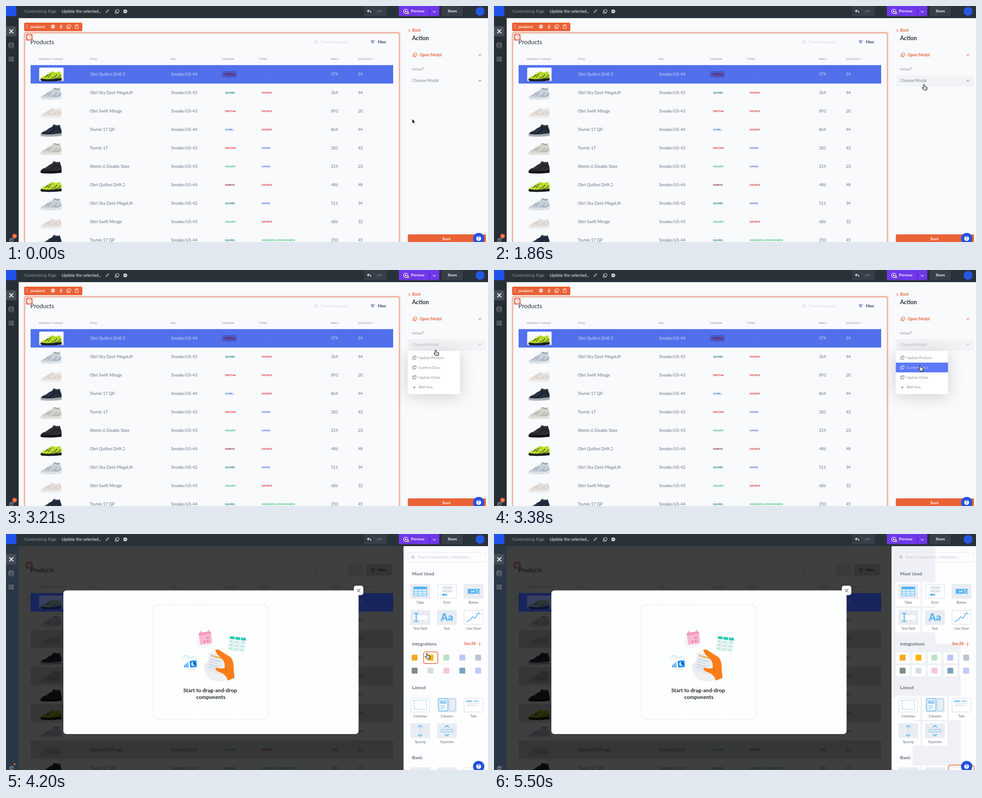
Write an HTML page that moves like this. It is 1067x525 px and loops after 6300 ms.

```html
<!DOCTYPE html>
<html lang="en">
<head>
<meta charset="utf-8">
<title>Product admin</title>
<style>
html, body { margin: 0; width: 100%; height: 100%; overflow: hidden; background: #f8fafc; }
svg { display: block; width: 100%; height: 100%; }
text { font-family: Lato, "Open Sans", sans-serif; white-space: pre; }
</style>
</head>
<body>
<svg id="stage" viewBox="0 0 1067 525"></svg>
<script>
const ORANGE = '#ea6237', BLUE = '#56b5ef', GREY = '#697483';

// Drawing helpers; text is placed by its vertical centre
const text = (x, y, s, size, fill, weight = 400, anchor = 'start') =>
  `<text x="${x}" y="${y}" dy=".35em" font-size="${size}" fill="${fill}" font-weight="${weight}" text-anchor="${anchor}">${s}</text>`;
const rect = (x, y, w, h, fill, r = 0, more = '') =>
  `<rect x="${x}" y="${y}" width="${w}" height="${h}" rx="${r}" fill="${fill}" ${more}/>`;
const circle = (x, y, r, fill, more = '') => `<circle cx="${x}" cy="${y}" r="${r}" fill="${fill}" ${more}/>`;
const line = (d, stroke, w = 1, more = '') =>
  `<path d="${d}" fill="none" stroke="${stroke}" stroke-width="${w}" ${more}/>`;
const shape = (d, fill, more = '') => `<path d="${d}" fill="${fill}" ${more}/>`;
const group = (id, body, more = '') => `<g id="${id}" ${more}>${body}</g>`;
const outline = (color, w = 1) => `stroke="${color}" stroke-width="${w}"`;

const copyIcon = (x, y, c) =>
  rect(x - 2, y - 4, 6, 6, 'none', 1, outline(c)) + line(`M${x - 2} ${y - 2}h-2v6h6v-2`, c);
const windowIcon = (x, y, c) => copyIcon(x, y, c) + line(`M${x - 2} ${y - 2.3}h6`, c);
const chevron = (x, y, c) => line(`M${x - 2.8} ${y - 1.3}l2.8 2.8l2.8 -2.8`, c, 1.1);
const searchIcon = (x, y, c) =>
  circle(x - .5, y - .5, 2.8, 'none', outline(c)) + line(`M${x + 1.6} ${y + 1.6}l2.2 2.2`, c);
const gearIcon = (x, y, c) =>
  circle(x, y, 2.5, 'none', outline(c, 1.8)) + circle(x, y, 3.9, 'none', outline(c, 1.2) + ' stroke-dasharray="1.6 1.46"');

// Table
const shoes = [
  ['Obri Quillon Drift 2', '#b7db2b', '#1c1f20', '#1c1f20', 0],
  ['Obri Sky Dash MegaLift', '#c8d0da', '#dfe3e9', '#7d8793', 1],
  ['Obri Swift Mirage', '#e3dfdd', '#ececec', '#dfb49f', 0],
  ['Tovrek 17 QP', '#1f2a38', '#a9acb1', '#444c5a', 1],
  ['Tovrek 17', '#d0d3cb', '#e0e2de', '#8d9786', 1],
  ['Wenlo 6 Double Slate', '#25272b', '#121315', '#4b4e54', 1],
];
const vendors = { DURVO: '#7a1320', QUORIL: '#12776f', MEZTAR: '#d8262c', UMBLI: '#3b6fd8', HALVEN: '#27b45c' };
const types = { SHORTS: '#d8262c', SHOES: '#3b5fe0', 'HOODIES &amp; SWEATSHIRTS': '#27b45c' };
const rows = [
  [0, 44, 'DURVO', 'SHOES', 579, 24], [1, 42, 'QUORIL', 'SHORTS', 364, 44],
  [2, 43, 'MEZTAR', 'SHORTS', 893, 20], [3, 44, 'UMBLI', 'SHORTS', 864, 44],
  [4, 42, 'MEZTAR', 'SHOES', 283, 43], [5, 43, 'HALVEN', 'SHOES', 214, 23],
  [0, 44, 'DURVO', 'SHORTS', 486, 48], [1, 42, 'QUORIL', 'SHOES', 511, 34],
  [2, 43, 'HALVEN', 'SHORTS', 686, 32], [3, 44, 'QUORIL', 'HOODIES &amp; SWEATSHIRTS', 350, 45],
];
const rowY = i => 152 + i * 41;

function shoe(y, [, upper, sole, accent, high]) {
  return `<g transform="translate(100 ${y + 1})">` +
    (high ? shape('M1 -6L6 -13Q13 -9 19 -12L22 0L5 2Z', upper) + line('M7 -11Q13 -7 19 -10', accent, 1.6) : '') +
    shape('M-23 10Q-22 4 -13 2L-3 -5L4 -8Q10 -2 19 -8Q24 -2 23 10Z', upper) +
    line('M-13 5L-6 -1M-7 6L0 -3M0 7Q8 7 13 -1M8 8Q18 7 21 1', accent, 1.2) +
    shape('M-23 8Q-8 12 23 7V13Q0 16 -21 14Q-25 12 -23 8Z', sole) + '</g>';
}

function tableRow([kind, size, vendor, type, price, count], i) {
  const y = rowY(i), first = i === 0, ink = first ? '#ccd5fb' : GREY;
  return (first ? rect(54.5, 131.5, 802.5, 41, '#5270eb') + rect(73.5, 137, 54, 30, '#fafcfd', 2) +
      rect(478.5, 145, 32.5, 14, '#4a57c4', 2) : '') +
    shoe(y, shoes[kind]) +
    text(185.5, y, shoes[kind][0], 9.2, ink) + text(365.5, y, 'Sneake/US-' + size, 9.1, ink) +
    text(485, y, vendor, 5.9, vendors[vendor], 700) +
    text(566, y, type, 5.9, first ? '#5875ec' : types[type], 700) +
    text(719.5, y, price, 8.8, ink) + text(779.5, y, count, 8.8, ink);
}

const heads = [[73, 'PRODUCT IMAGE'], [185, 'TITLE'], [365, 'SKU'], [478, 'VENDOR'], [559, 'TYPES'], [719, 'PRICE'], [779, 'QUANTITY']];
const table =
  text(54, 80, 'Products', 13.5, '#262d36') +
  searchIcon(687, 80, '#c5cad2') + text(698.5, 80, 'Search products...', 8, '#d3d8de') +
  line('M807 77.5h9M808.7 80.3h5.6M810.2 83h2.6', '#1f3380', 1.2) +
  text(823, 80, 'Filter', 8, '#1f2a55', 700) +
  heads.map(([x, s]) => text(x, 118, s, 6.5, '#858e9b')).join('') +
  rows.map(tableRow).join('') +
  rect(44, 62, 15, 15, '#e58877', 2) + circle(51.5, 69.5, 4.7, '#fff') +
  line('M51.5 66.8v3.3M51.5 71.2v1.2', '#d9705c', 1.3);

const selection =
  rect(40.5, 59, 831, 480, 'none', 4, outline('#f7d6cc', 4)) +
  rect(41.5, 60, 829, 480, 'none', 3, outline('#ec9780', 1.3)) +
  rect(40, 37, 129, 19, ORANGE, 3) +
  line('M45.5 42v9M48 42v9', '#fff', 1.1, 'stroke-dasharray="1.1 2.3"') +
  text(54, 46, 'products', 8.2, '#fff', 700) +
  gearIcon(104, 46, '#fff') + line('M123 41.8l-4 5h2.6l-1 4l4 -5.2h-2.6z', '#fff', .9) +
  copyIcon(139, 46, '#fff') + line('M152.7 43h7.6M155 43v-1.3h3v1.3M153.7 43v7h5.6v-7', '#fff', .9);

// Action panel and its menu
const actionPanel =
  rect(880, 27, 187, 498, '#f8fafc') +
  line('M894 51.8l-2.4 2.8l2.4 2.8', ORANGE, 1.1) + text(899, 54, 'Back', 8.8, ORANGE, 700) +
  text(899, 72, 'Action', 12.6, '#262d36', 700) +
  copyIcon(905, 109, ORANGE) + text(916, 108.5, 'Open Modal', 8.8, ORANGE, 700) + chevron(1049, 109, ORANGE) +
  text(899, 140.5, 'MODAL', 6.5, '#6d7683') + text(921.5, 140, '*', 9, ORANGE, 700) +
  group('hover', rect(890, 154, 172.5, 25, '#f2f3f5', 3)) +
  group('choose', text(899.5, 165.5, 'Choose Modal', 9.2, '#75808e') + chevron(1049, 166, '#75808e')) +
  rect(889.5, 508, 173, 30, ORANGE, 3) + text(975.5, 518, 'Back', 8.2, '#fff', 700, 'middle');

const options = ['Update Product', 'Confirm Docs', 'Update Order', 'Add new'];
const optionTop = i => 184.2 + i * 21.8;
const menu =
  rect(889.5, 180, 115.5, 96, '#fff', 5, 'filter="url(#shade)"') +
  options.map((s, i) => {
    const y = optionTop(i) + 10.9;
    const label = c => (i < 3 ? windowIcon(904, y, c) : line(`M904 ${y - 3}v7M900.5 ${y + .5}h7`, c)) + text(913.5, y, s, 8, c);
    return label('#858d99') + group('option' + i, rect(889.5, optionTop(i), 115.5, 21.7, '#5c79fa') + label('#d2dafe'));
  }).join('');

// Component panel
const cards = [];
const addCard = (x, y, w, h) => { cards.push([x, y, w, h]); return rect(x, y, w, h, '#fff', 3); };
const colX = [895, 954, 1013];
function tile(col, y, label, icon, boxed) {
  const x = colX[col];
  return addCard(x - 6, y - 4, 55, 54) + rect(x, y, 44, 33, '#e9ecf3', 1.5) +
    (boxed ? rect(x + 2, y + 2, 40, 29, '#fff', 2) : '') +
    `<g transform="translate(${x} ${y})">${icon}</g>` + text(x + 22, y + 42, label, 7.1, '#5a626d', 400, 'middle');
}
const arrows = (up, down) => line(`M17.5 ${up + 4}l4.5 -4l4.5 4M17.5 ${down - 4}l4.5 4l4.5 -4`, BLUE, 2);
const tiles = [
  [0, 111, 'Table', rect(7.5, 6.5, 29, 20, '#e3f2fc', 1.5, outline(BLUE, 1.2)) + rect(7, 6, 30, 6, BLUE, 1.5) + line('M7 17h30M7 22h30M17 12v15M27 12v15', BLUE, 1)],
  [1, 111, 'Form', [6, 14].map(y => rect(12, y, 22, 4.5, '#e3e7ee', 2, outline('#cbd2dd', .7))).join('') + rect(11, 22, 11, 4, BLUE, 1), 1],
  [2, 111, 'Button', rect(9, 11, 27, 11, BLUE, 1) + text(20, 16.5, 'OK', 6, '#fff', 900, 'middle') + shape('M28 13l10 4l-4.2 1.8l3 4l-2 1.5l-3 -4l-2.5 3z', BLUE, outline('#fff'))],
  [0, 169, 'Text Field', rect(6, 11, 33, 11, '#fff', 1.5, outline('#d6dce5', .8)) + line('M8 7.5h10M8 25.5h10M13 7.5v18', BLUE, 2.2)],
  [1, 169, 'Text', text(22, 16.5, 'Aa', 22, BLUE, 900, 'middle')],
  [2, 169, 'Line Chart', line('M6 26L14 23L20 15L25 19L33 6L37 10', BLUE, 1.6), 1],
  [0, 364, 'Container', rect(8, 6, 28, 20, 'none', 1, outline(BLUE) + ' stroke-dasharray="3 2"'), 1],
  [1, 364, 'Columns', rect(4, 2.5, 20, 27, '#f6fbff', 2, outline(BLUE, 1.3)) + rect(7, 6, 14, 8, '#9dd2f5') + line('M7 18h10M7 21.5h12M7 25h8', '#9dd2f5', 1.3) + rect(27, 2.5, 14, 27, 'none', 1, outline(BLUE) + ' stroke-dasharray="3 2"')],
  [2, 364, 'Tabs', line('M6 8h12', BLUE, 2.6) + line('M21 8h12', '#8fccf3', 2.6) + line('M7 14h28M7 18h22', '#d7dce5', 1.5), 1],
  [0, 421, 'Spacing', arrows(5, 29) + line('M22 10v15', BLUE, 1.2, 'stroke-dasharray="1.5 2"')],
  [1, 421, 'Separator', arrows(5, 28) + line('M7 14h30M7 19h30', BLUE, 1.2)],
  [0, 519, '', ''], [1, 519, '', ''], [2, 519, '', '', 1],
];
const swatches = ['#f9a825', '#fcb400', '#b8e2c5', '#bcc6f5', '#b8c3d2', '#7f8c89', '#d6dde3', '#f5c5d9', '#7aa3c0', '#c0c8fa'];
const section = (y, s) => text(899, y, s, 10.1, '#636c79', 700);
const components =
  rect(880, 27, 187, 498, '#fdfdff') +
  group('backdrop', shape('M880 27H977V244H1033V525H927V366H880Z', '#f0f1f6')) +
  rect(890, 40.5, 172, 22, 'none', 4, outline('#e3e6ec')) + searchIcon(901, 51.5, '#8e96a2') +
  text(912, 51.5, 'Search components, integrations...', 7.9, '#bbc1cb') +
  section(88, 'Most Used') + section(244, 'Integrations') + section(341, 'Layout') + section(497, 'Basic') +
  text(1014, 244.5, 'See All', 8.5, ORANGE, 700) + line('M1047 242l2.6 3l-2.6 3', ORANGE, 1.2) +
  swatches.map((c, i) => {
    const x = 890 + i % 5 * 35.2, y = i < 5 ? 263 : 292;
    return addCard(x, y, 30, 24.5) + rect(x + 8, y + 5.5, 13, 13, c, 1.5);
  }).join('') +
  tiles.map(a => tile(...a)).join('') +
  '<rect id="focus" rx="4" fill="none" stroke="#ee6128" stroke-width="1.5"/>';

// Modal with its drawing
const drawing =
  circle(439, 237, 18, '#f3f5f8') + shape('M437 290Q440 327 470 328Q505 327 499 300L470 275Z', '#eef0f4') +
  '<g transform="rotate(-7 441 231)">' + rect(428, 218, 27, 27, '#f8b8d2', 2) + rect(428, 218, 27, 6, '#f19cbf', 2) +
  line('M433 214v6M450 214v6', '#e987b0', 1.5) +
  [[445, 230], [437, 237], [444, 237]].map(([x, y]) => rect(x, y, 4, 4, '#ec76a5')).join('') + '</g>' +
  '<g transform="rotate(7 511 244)">' + rect(493, 228, 37, 33, '#eef1f5', 2) +
  [494, 506.5, 519].map(x => rect(x, 229, 10.5, 6, '#27cdae', 1) +
    [238, 246, 254].map(y => rect(x, y, 10.5, 5, '#d5f2ec', 1) + line(`M${x + 2} ${y + 2.5}h5`, '#6adcc6')).join('')).join('') + '</g>' +
  line('M392 273q6 -5 12 0t13 -2', '#79d4df', 1) + line('M392 277q7 -4 13 0t12 0M404 302q8 -4 15 1', '#bce3ee', .8) +
  line('M395.5 297v-6M399 297v-9M402.5 297v-11', '#1d8cf0', 2) +
  '<g transform="rotate(-6 415 289)">' + rect(407, 281.5, 15, 15, '#1d8cf0', 2) + circle(414.5, 289, 4.5, '#b9e6ff') +
  shape('M414.5 289v-4.5a4.5 4.5 0 0 1 3 8z', '#0b4fae') + '</g>' +
  '<g transform="rotate(15 462 288)">' + rect(446, 266, 33, 42, '#e6eaf0', 2) +
  line('M450 273h24', '#f5b047', 3) + line('M450 281h23M450 287h18M450 293h20M450 299h12', '#bcc7d5', 1.4) + '</g>' +
  shape('M463 258Q470 255 478 262L497 274Q505 283 504 300L506 320L491 326Q488 315 479 310Q464 305 463 299Q466 296 473 299L484 299Q486 285 477 276Q466 268 463 258Z', '#fb7d1a') +
  line('M484 299Q489 303 489 309', '#d95f08', 1.2);
const modal =
  rect(28, 27, 852, 498, '#000', 0, 'opacity=".75"') +
  rect(54.5, 131.5, 802.5, 41, '#2440d0', 0, 'opacity=".22"') +
  rows.map((_, i) => i && i % 2 === 0 ? rect(54.5, rowY(i) - 20.5, 802.5, 41, '#000', 0, 'opacity=".14"') : '').join('') +
  rect(757, 67.5, 36, 25, '#000', 3, 'opacity=".08"') + rect(797, 67.5, 57, 25, '#000', 3, 'opacity=".16"') +
  rect(127, 125.5, 653.5, 319.5, '#fdfefe', 7) + rect(770, 115, 21, 21, '#fdfefe', 5) +
  line('M777 122.3l7 7M784 122.3l-7 7', '#5b6470', 1.1) +
  rect(326, 157.5, 255, 255, 'none', 11, outline('#dde1e6', 1.2) + ' stroke-dasharray="5 4"') + drawing +
  text(452, 348, 'Start to drag-and-drop', 11.9, '#20262e', 700, 'middle') +
  text(453.5, 363, 'components', 11.8, '#20262e', 700, 'middle');

// Frame of the editor
const chrome =
  rect(0, 0, 1067, 27, '#2a3239') + '<rect id="side" y="27" width="28" height="498"/>' +
  rect(0, 0, 23, 22.5, '#1f52ee', 4) +
  text(41, 11.5, 'Customizing Page', 9.1, '#8d959e') + text(123, 11.5, 'Update the selected...', 9.3, '#f3f5f7') +
  line('M221 15l.5 -2.4l4.6 -4.6l1.9 1.9l-4.6 4.6z', '#e4e7ea') + copyIcon(246, 12, '#e4e7ea') + gearIcon(264, 12, '#fff') +
  rect(792.5, -4, 50.5, 26.5, '#363e47', 3) +
  line('M803 8.5l-2.8 2.7l2.8 2.7M800.5 11.2h5q2.5 0 2.5 4', '#fff', 1.3) +
  line('M827 8.5l2.8 2.7l-2.8 2.7M829.5 11.2h-5q-2.5 0 -2.5 4', '#747d87', 1.2) +
  rect(869.5, -4, 89.5, 26.5, '#6e38ea', 3) + line('M937.5 0v22.5', '#4c23b0') +
  circle(885, 12, 4.8, 'none', outline('#fff', 1.2)) + shape('M883.6 9.5l4 2.5l-4 2.5z', '#fff') + circle(890, 15.7, 2.3, '#f5c93c') +
  text(896.5, 11.5, 'Preview', 8.3, '#fff', 700) + chevron(948, 12.5, '#fff') +
  rect(965, -4, 46, 26.5, '#363e47', 3) + text(988, 11.5, 'Share', 8.3, '#fff', 700, 'middle') +
  circle(1049.5, 12, 9.8, '#2357e8') +
  rect(-3, 45, 26, 22.5, '#454e57', 4) +
  line('M7.5 52l8.5 8.5M16 52l-8.5 8.5', '#fff', 2) + line('M8 57l3 -3M13 59l3 -3', '#454e57', .8) +
  '<ellipse cx="11.5" cy="83.5" rx="4.8" ry="1.8" fill="none" stroke="#98a1aa"/>' +
  line('M6.7 83.5v8q4.8 3.6 9.6 0v-8M6.7 87.5q4.8 3.6 9.6 0', '#98a1aa') +
  rect(7, 113.5, 3.6, 9, 'none', .5, outline('#98a1aa')) + rect(13, 113.5, 3.6, 3, 'none', .5, outline('#98a1aa')) +
  rect(13, 119, 3.6, 3.5, 'none', .5, outline('#98a1aa')) +
  windowIcon(12, 521, '#98a1aa') +
  group('badge', circle(0, 0, 5.2, ORANGE) + text(0, 0, '3', 6.5, '#fff', 400, 'middle'));

const help =
  circle(1046.3, 517.3, 12.6, '#2450e2') + circle(1046.3, 517.3, 5.4, '#fff') +
  text(1046.3, 517.5, '?', 8.5, '#2450e2', 900, 'middle');

const pointer = group('pointer',
  group('arrow', shape('M0 0V10L2.4 7.9L4 11.5L5.7 10.8L4.2 7.2H7.3Z', '#111', outline('#fff', .8))) +
  group('hand', shape('M-1.4 7V1Q0 -1.2 1.4 1V4.4L5.6 5.4Q7.2 6 6.8 8L5.8 12H.2L-3.8 7.6Q-3.6 5.4 -1.4 7Z', '#fff', outline('#111', 1.1)) +
    line('M1.2 7.5v2.5M3.2 7.5v2.5M5 7.5v2.5', '#111', .6)));

document.getElementById('stage').innerHTML =
  '<defs><filter id="shade" x="-60%" y="-60%" width="220%" height="220%">' +
  '<feDropShadow dx="0" dy="5" stdDeviation="17" flood-color="#000" flood-opacity=".17"/></filter></defs>' +
  table + group('editing', selection + actionPanel + group('menu', menu)) +
  group('building', modal + components) + chrome + help + pointer;

// Motion
const $ = id => document.getElementById(id);
const show = (id, on) => $(id).setAttribute('opacity', Number(on));
const clamp = v => Math.max(0, Math.min(1, v));
const smooth = p => p * p * (3 - 2 * p);
const inside = (x, y, [bx, by, w, h]) => x >= bx && x < bx + w && y >= by && y < by + h;
const moves = [
  [1320, 1860, 952, 175, smooth],
  [3150, 3670, 932, 266, smooth],
  [4750, 5500, 1022, 527, p => p * p],
];

function draw() {
  const t = performance.now() % 6300, building = t >= 4200;
  let x = 899, y = 251;
  for (const [from, to, tx, ty, ease] of moves) {
    const p = ease(clamp((t - from) / (to - from)));
    x += (tx - x) * p;
    y += (ty - y) * p;
  }
  const open = t < 2220 ? 0 : clamp((t - 2160) / 150);
  show('editing', !building);
  show('building', building);
  show('hover', t > 1800);
  show('choose', 1 - open * .5);
  show('menu', open);
  options.forEach((_, i) => show('option' + i, inside(x, y, [889, optionTop(i), 116, 21.8])));
  show('backdrop', clamp((t - 4800) / 400));

  const card = building && cards.find(c => inside(x, y, c));
  show('focus', !!card);
  if (card) ['x', 'y', 'width', 'height'].forEach((k, i) => $('focus').setAttribute(k, card[i] + (i < 2 ? -.7 : 1.4)));

  $('side').setAttribute('fill', building ? '#2a3845' : '#262e36');
  const size = building ? .4 * clamp((4320 - t) / 120) : 1;
  $('badge').setAttribute('transform', `translate(19 512) scale(${size})`);
  $('pointer').setAttribute('transform', `translate(${x} ${y})`);
  show('arrow', t <= 1800);
  show('hand', t > 1800);
  requestAnimationFrame(draw);
}
draw();
</script>
</body>
</html>
```
